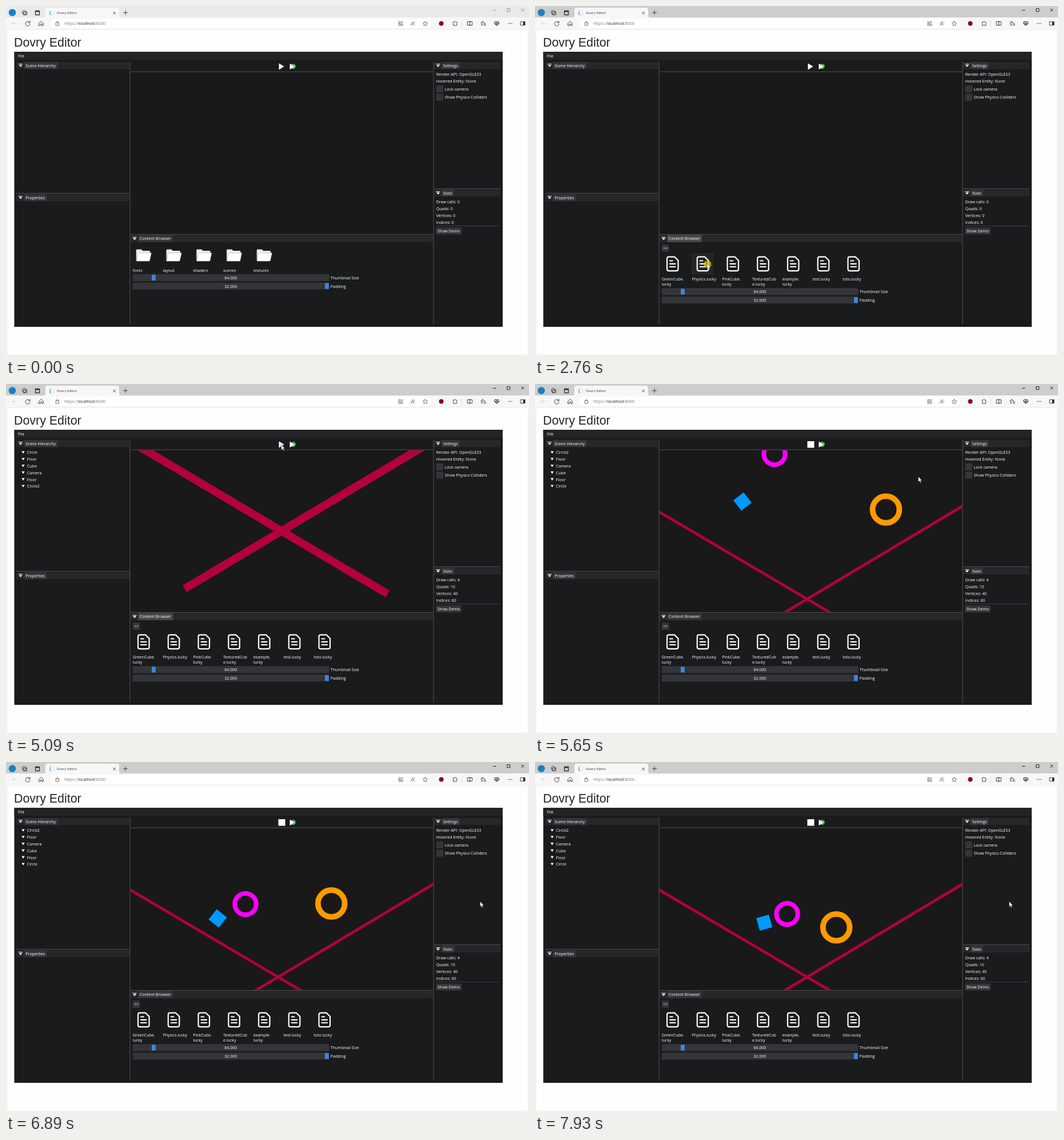
An HTML page for the animation above (8000 ms loop, 915 px wide and 612 px high).

```html
<!DOCTYPE html>
<html lang="en">
<head>
<meta charset="utf-8">
<title>Dovry Editor</title>
<style>
html, body { margin: 0; width: 100%; height: 100%; overflow: hidden; background: #f7f7f7; }
svg { display: block; width: 915px; height: 612px; }
text { font-family: "Open Sans", "Noto Sans", sans-serif; white-space: pre; }
.ui text { font-size: 7.05px; fill: #fff; }
.line { fill: none; stroke: #333; stroke-width: .9; stroke-linecap: round; stroke-linejoin: round; }
.rule { fill: none; stroke: #505155; }
.floor { fill: none; stroke: #b3003d; }
</style>
</head>
<body>
<svg viewBox="0 0 915 612">
  <defs>
    <clipPath id="view"><path d="M218 116H747.5V398.500H218Z"/></clipPath>
    <g id="fold"><path d="M-3.800 -2.700H3.200V-1.700H-3.800ZM-3.500 -.6H2.900L-.3 2.800Z" fill="#fff"/></g>
    <g id="folder">
      <path d="M-13 10V-9Q-13 -10.500 -11.500 -10.500H-4L-1.500 -8H10Q11.500 -8 11.500 -6.500V8Z" fill="#e9e2e6"/>
      <path d="M-11.500 -6.500H9.500V5H-11.500Z" fill="#fff"/>
      <path d="M-10 -3.500Q-9.700 -4.500 -8.500 -4.500H12.800Q14 -4.500 13.600 -3.300L10.800 9Q10.500 10.200 9.300 10.200H-12.500Z" fill="#fff" stroke="#777" stroke-width=".5"/>
    </g>
    <g id="doc" fill="none" stroke="#fff" stroke-width="2.200" stroke-linejoin="round" stroke-linecap="round">
      <path d="M-6.500 -12.300H3.500L9.800 -6V9Q9.800 12.200 6.600 12.200H-6.500Q-9.700 12.200 -9.700 9V-9Q-9.700 -12.300 -6.500 -12.300Z"/>
      <path d="M-4.800 -5.500H0M-4.800 -.2H4.800M-4.800 5H4.800"/>
    </g>
  </defs>

  <!-- browser -->
  <path d="M0 0H915V612H0Z" fill="#f7f7f7"/>
  <path id="strip" d="M0 0H915V20H0Z"/>
  <path d="M66 20Q69 20 69 17V7Q69 3 73 3H194Q198 3 198 7V17Q198 20 201 20Z" fill="#f7f7f7"/>
  <circle cx="11" cy="11.500" r="6.300" fill="#1c7fc4"/>
  <g class="line">
    <path d="M29 9L32 7.500 35 9V13L32 14.500 29 13ZM31 10.500H36.500V15.500H31Z"/>
    <path d="M51.500 8.500H58.500V15.500H51.500ZM51.500 9.800H58.500" stroke-width="1.300"/>
    <path d="M187.500 10.200L191.500 14.200M191.500 10.200L187.500 14.200M205.500 11.700H212.500M209 8.200V15.200"/>
    <path d="M18 30.500H11M14 27.500L11 30.500 14 33.500" stroke="#ccc"/>
    <path d="M41.500 29A4 4 0 1 0 42 31.500M42 26.500V29.200H39.200M57.800 30L61.500 26.500 65.200 30V34.200H62.800V31.500H60.200V34.200H57.800Z"/>
  </g>
  <path d="M77.500 7.500H81L83.500 10V15.500H77.500Z" fill="#fff" stroke="#b9cad8" stroke-width=".6"/>
  <path d="M76.500 9H78V16H76.500Z" fill="#4aa0dc"/>
  <text x="89" y="14.200" font-size="6.100" fill="#333">Dovry Editor</text>
  <rect x="77" y="22.500" width="667" height="16" rx="8" fill="#fff"/>
  <g class="line" stroke-width=".8">
    <path d="M87.500 29H92.500V34H87.500ZM88.700 29V28Q90 25.500 91.300 28V29" style="stroke:#666"/>
    <path d="M687.300 27.500H690V30.200H687.300ZM687.300 31.500H690V34.200H687.300ZM691.500 31.500H694.200V34.200H691.500ZM692.800 26.700V29.700M691.300 28.200H694.300" style="stroke:#777"/>
    <path d="M708.500 34L711.300 27 714 34M709.500 31.800H713M714.500 27.500Q715.500 28.500 714.800 30" style="stroke:#777"/>
    <path d="M733.500 26.500L734.800 29.200 737.700 29.500 735.500 31.500 736.100 34.500 733.500 33 730.900 34.500 731.500 31.500 729.300 29.500 732.200 29.200Z" style="stroke:#666"/>
    <path d="M782.500 28H784.500Q785.500 25.500 786.500 28H788.500V30Q791 31 788.500 32V34H782.500V32Q784.500 31 782.500 30Z"/>
    <path d="M807.500 27.500H815.500V33.500H807.500ZM811.500 26.500V34.500"/>
    <path d="M834 26.800L835 29 837.300 29.300M834 26.800L833 29 830.800 29.300 832.500 31 832 33.800 834 32.500M836 31.200H839.500M836 33.500H839.500"/>
    <path d="M858.500 34L855 30.500Q854 28 856.500 27.200 858 27.200 858.500 28.500 859.500 27 861 27.500 863 28.500 861.800 30.500ZM855 31H857.500L858.500 29.500 859.800 32 861 31H863" stroke-width="1.100"/>
    <path d="M900.500 27.500H908V33.500H900.500Z"/>
  </g>
  <path d="M905 27.500H908V33.500H905Z" fill="#222"/>
  <path d="M797.500 25V36" stroke="#ddd"/>
  <g fill="#333"><circle cx="879" cy="30.500" r=".8"/><circle cx="882" cy="30.500" r=".8"/><circle cx="885" cy="30.500" r=".8"/></g>
  <circle cx="761.500" cy="30.500" r="4" fill="#800f1c"/>
  <text x="102" y="33" font-size="7.100" fill="#777">https://<tspan fill="#222">localhost</tspan>:8000</text>
  <path id="winButtons" d="M852 7.500H857.500M876.700 4.700H881.700V9.700H876.700ZM901.300 4.700L906.300 9.700M906.300 4.700L901.300 9.700" fill="none" stroke-width=".9"/>
  <rect x="1.500" y="41" width="912.500" height="569.500" rx="4" fill="#fefefe" stroke="#e4e4e4" stroke-width=".8"/>
  <text x="14" y="70.700" font-size="21.400" fill="#212529" style="font-family:'Liberation Sans',Arial,sans-serif">Dovry Editor</text>

  <!-- editor -->
  <path d="M14.500 80H869V561H14.500Z" fill="#1a1b1d"/>
  <path d="M14.500 80H869V94H14.500Z" fill="#242425"/>
  <path d="M218 116H747V399H218Z" fill="#191919"/>
  <g class="ui" id="ui"></g>
  <g class="ui" id="rows"></g>
  <g class="ui" id="stats"></g>
  <path class="rule" d="M217 97V557M748 97V557M218 115H747M218 399.500H747M18 327.500H216M749 319.500H865"/>
  <path d="M753 384.500H862" stroke="#3c3d41"/>
  <circle cx="502.300" cy="105.600" r="4.600" fill="#56a854"/>
  <path d="M496.500 100.800L505 105.800 496.500 110.900Z" fill="#fff"/>
  <path id="play" d="M477.500 100.300L486.700 105.800 477.500 111.500Z" fill="#fff"/>
  <path id="stop" d="M476.500 100H488.500V111.500H476.500Z" fill="#fff"/>

  <rect id="hover" width="38" height="37"/>
  <g class="ui" id="folders"></g>
  <g class="ui" id="files"></g>
  <g class="ui" id="sliders"></g>

  <g clip-path="url(#view)">
    <g id="edit" class="floor" stroke-width="13.800"><path d="M312.500 358L754.300 95M667.500 367L208.800 95"/></g>
    <g id="game">
      <path class="floor" stroke-width="4.800" d="M200 213.400L530 407.800M420 409.500L765 203.200"/>
      <circle id="pink" r="18.700" fill="none" stroke="#f0f" stroke-width="8"/>
      <circle id="orange" r="23.400" fill="none" stroke="#f90" stroke-width="9.800"/>
      <path id="cube" d="M-11.400 -11.400H11.400V11.400H-11.400Z" fill="#09f"/>
    </g>
  </g>

  <g id="cursor">
    <circle id="press" cx=".8" cy="1.500" r="6.600" fill="#d6d600" opacity=".7"/>
    <path d="M0 0V9.300L2.200 7.300 3.800 10.800 5.300 10.100 3.800 6.800H6.700Z" fill="#fff" stroke="#111" stroke-width=".5"/>
  </g>
</svg>
<script>
const LOOP = 8000, G = 118, STEP = 52.75;
const FOCUS = 1030, OPEN = 1500, LOAD = 3520, PLAY = 5380;
const $ = id => document.getElementById(id);
const show = (id, on) => $(id).style.display = on ? '' : 'none';
const text = (x, y, s, extra = '') => `<text x="${x}" y="${y}" ${extra}>${s}</text>`;
const box = (x, y, w, h, fill, extra = '') =>
  `<rect x="${x}" y="${y}" width="${w}" height="${h}" fill="${fill}" ${extra}/>`;

const panel = (x, y, w, tabW, name, id = '') =>
  box(x, y, w, 12.3, '#262729') +
  box(x + 13.5, y, tabW, 12.3, '#343538', `id="${id}" rx="1"`) +
  `<use href="#fold" x="${x + 7.8}" y="${y + 5.8}"/>` + text(x + 16.2, y + 8.8, name);

$('ui').innerHTML =
  text(21, 89.7, 'File') +
  panel(18, 98, 198, 59.5, 'Scene Hierarchy') +
  panel(18, 329, 198, 40, 'Properties') +
  panel(217.5, 400.6, 529.5, 61, 'Content Browser', 'tab') +
  panel(748.5, 98, 116.5, 31.5, 'Settings') +
  panel(748.5, 320.8, 116.5, 22, 'Stats') +
  text(752.7, 122.3, 'Render API: OpenGLES3') +
  text(752.7, 134.2, 'Hovered Entity: None') +
  box(752.7, 138.7, 12.3, 12.3, '#343538') + text(767.7, 147.6, 'Lock camera') +
  box(752.7, 153.3, 12.3, 12.3, '#343538') + text(767.7, 162.3, 'Show Physics Colliders') +
  box(752.3, 387.3, 44.7, 12.2, '#343538') + text(754.7, 396, 'Show Demo');

const item = (icon, y, labelY) => (name, i) => {
  const x = 221.7 + STEP * i;
  return `<use href="#${icon}" x="${x + 19}" y="${y}"/>` +
    name.split('|').map((s, k) => text(x, labelY + 9.7 * k, s)).join('');
};
$('folders').innerHTML = ['fonts', 'layout', 'shaders', 'scenes', 'textures']
  .map(item('folder', 436, 464.5)).join('');
$('files').innerHTML =
  box(221.7, 417.3, 12.6, 12.4, '#343538') + text(224, 426.1, '&lt;&lt;') +
  ['GreenCube.|lucky', 'Physics.lucky', 'PinkCube.|lucky', 'TexturedCub|e.lucky',
    'example.|lucky', 'test.lucky', 'toto.lucky'].map(item('doc', 451, 479.5)).join('');

const slider = (y, value, knob, name) =>
  box(221.7, y, 343.6, 12.2, '#343538', 'class="track"') +
  box(knob, y + 1, 6.8, 10.2, '#3d85e0') +
  text(393.3, y + 8.9, value, 'text-anchor="middle"') + text(567.8, y + 8.9, name);
$('sliders').innerHTML = slider(468.8, '64.000', 255, 'Thumbnail Size') +
  slider(483.6, '32.000', 558, 'Padding');
const tracks = document.querySelectorAll('.track');

const loaded = ['Circle', 'Floor', 'Cube', 'Camera', 'Floor', 'Circle2'];
const rowsHtml = names => names.map((s, i) => {
  const y = 122.4 + 11.8 * i;
  return `<path d="M27.300 ${y - 5}H32.700L30 ${y - .6}Z" fill="#fff"/>` + text(36.8, y, s);
}).join('');
const statsHtml = counts => ['Draw calls', 'Quads', 'Vertices', 'Indices']
  .map((s, i) => text(752.7, 345.4 + 11.8 * i, `${s}: ${counts[i]}`)).join('');

// time, x, y
const path = [[130, 830, 605], [890, 432, 456], [1100, 397, 441], [1960, 397, 441],
  [2690, 301, 450], [2800, 301, 450], [3250, 396.5, 319], [4060, 396.5, 319],
  [4810, 498, 142], [5120, 481, 105], [5390, 481, 105], [5650, 670.5, 162], [6490, 829.5, 244]];
const presses = [[FOCUS, 1110], [1430, OPEN], [2750, LOAD], [5310, PLAY]];

// launch time, x, y, velocity x, velocity y
const flights = {
  pink: [[5410, 419, 119, 0, 0], [7220, 419, 312, 149, -116], [7570, 471, 278.6, -83, -57]],
  orange: [[5410, 614, 216, 0, 0], [6260, 614, 258.6, -71, -55], [7570, 521, 288, 17, -18]],
  cube: [[5410, 363, 202, 0, 0], [6638, 363, 291, 29.5, -84]]
};

function pointer(t) {
  const i = path.findIndex(p => p[0] > t);
  if (i < 0) return path[path.length - 1].slice(1);
  const [t0, x0, y0] = path[Math.max(0, i - 1)], [t1, x1, y1] = path[i];
  const u = Math.max(0, (t - t0) / (t1 - t0)), k = u * u * (3 - 2 * u);
  return [x0 + (x1 - x0) * k, y0 + (y1 - y0) * k];
}

function ballistic(legs, t) {
  const [t0, x, y, vx, vy] = legs.filter((l, i) => !i || l[0] <= t).pop();
  const s = Math.max(0, t - t0) / 1000;
  return [x + vx * s, y + vy * s + G / 2 * s * s];
}

let phase = '';
function setPhase(t) {
  const focused = t >= FOCUS, open = t >= OPEN, ready = t >= LOAD, playing = t >= PLAY;
  const next = [focused, open, ready, playing].join();
  if (next === phase) return;
  phase = next;
  $('strip').setAttribute('fill', focused ? '#cdcdcd' : '#e9e9e9');
  $('winButtons').setAttribute('stroke', focused ? '#111' : '#8c8c8c');
  $('tab').setAttribute('fill', focused && !playing ? '#474849' : '#343538');
  show('folders', !open);
  show('files', open);
  $('sliders').setAttribute('transform', `translate(0 ${open ? 24.5 : 0})`);
  $('rows').innerHTML = ready ? rowsHtml(playing ? [...loaded].reverse() : loaded) : '';
  $('stats').innerHTML = statsHtml(ready ? [4, 10, 40, 60] : [0, 0, 0, 0]);
  show('edit', ready && !playing);
  show('game', playing);
  show('play', !playing);
  show('stop', playing);
}

function draw(t) {
  setPhase(t);
  const [x, y] = pointer(t), open = t >= OPEN;
  const pressed = presses.some(([a, b]) => t >= a && t < b);
  show('cursor', t >= 130);
  show('press', pressed);
  $('cursor').setAttribute('transform', `translate(${x} ${y})`);

  const cell = Math.floor((x - 221.7) / STEP), left = 221.7 + STEP * cell, top = open ? 432.3 : 417.3;
  show('hover', cell >= 0 && cell < (open ? 7 : 5) && x < left + 38 && y > top && y < top + 37);
  $('hover').setAttribute('x', left);
  $('hover').setAttribute('y', top);
  $('hover').setAttribute('fill', pressed ? '#262627' : '#4b4c4e');
  tracks.forEach((track, i) => {
    const dy = y - (open ? 24.5 : 0) - 468.8 - 14.8 * i;
    const on = t >= 130 && x > 221.7 && x < 565.3 && dy > 0 && dy < 12.2;
    track.setAttribute('fill', on ? '#4b4c4e' : '#343538');
  });

  for (const id in flights) {
    const spin = id === 'cube' ? 52 - .052 * Math.max(0, t - 6638) : 0;
    $(id).setAttribute('transform', `translate(${ballistic(flights[id], t)}) rotate(${spin})`);
  }
}

const start = performance.now();
function tick() {
  draw((performance.now() - start) % LOOP);
  requestAnimationFrame(tick);
}
tick();
</script>
</body>
</html>
```
